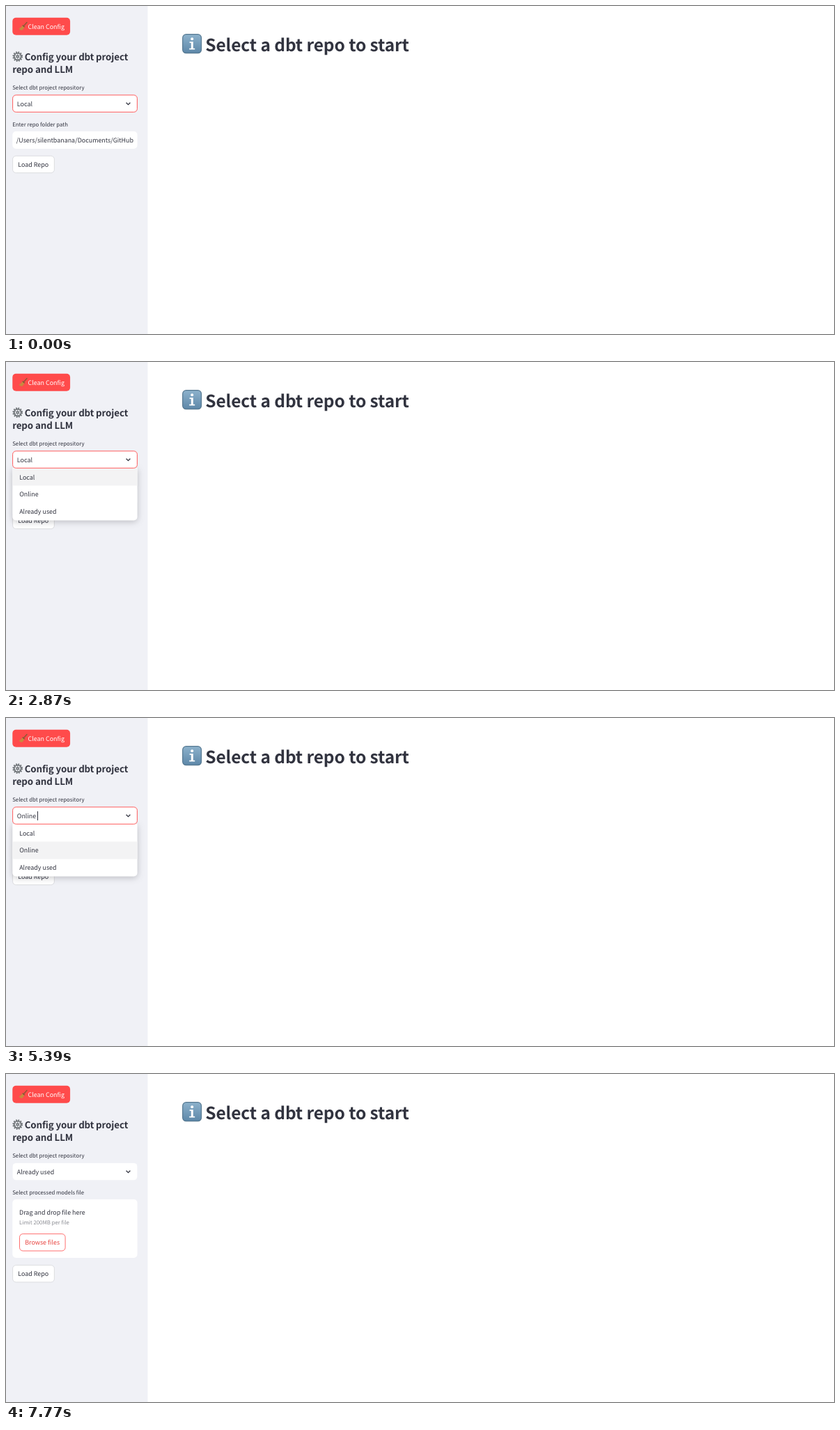
An HTML page for the animation above (8000 ms loop, 1189 by 471 pixels).

```html
<!DOCTYPE html>
<html lang="en">
<head>
<meta charset="utf-8">
<title>Repo setup</title>
<style>
  html, body { margin: 0; width: 100%; height: 100%; overflow: hidden; background: #fff; }
  svg { display: block; width: 1189px; height: 471px; }
  text {
    font: 8.93px "Noto Sans CJK JP", "Noto Sans CJK SC", "Noto Sans CJK", Lato, sans-serif;
    fill: #31333f; text-rendering: geometricPrecision; white-space: pre;
  }
  .small { font-size: 7.8px; }
  .dim { fill: #8b8c93; }
  .h1 { font-size: 24.5px; font-weight: 700; letter-spacing: -.12px; }
  .h2 { font-size: 13.37px; font-weight: 700; letter-spacing: -.13px; }
  .field { fill: #fff; }
  .button { fill: #fff; stroke: #d5d6da; stroke-width: .8; }
  #menu { filter: drop-shadow(0 2.5px 5px rgba(38, 39, 48, .26)); }
  .hot rect { stroke: #ff4b4b; }
  .hot text { fill: #e8433f; }
</style>
</head>
<body>
<svg viewBox="0 0 1189 471">
  <defs>
    <linearGradient id="steel" x2="0" y2="1">
      <stop offset="0" stop-color="#8db2cc"/>
      <stop offset="1" stop-color="#5d87a8"/>
    </linearGradient>
  </defs>

  <rect width="1189" height="471" fill="#fff"/>
  <rect width="203.5" height="471" fill="#f0f1f6"/>

  <!-- page title -->
  <rect x="253.7" y="40.7" width="26.8" height="27" rx="5" fill="url(#steel)" stroke="#557891" stroke-width="1.2"/>
  <g fill="#fff">
    <circle cx="267.2" cy="47.2" r="2"/>
    <path d="M263.6 51.2h5.2v9.6h2.4v1.8h-8v-1.8h2.6v-7.8h-2.2z"/>
  </g>
  <text class="h1" x="286.3" y="65">Select a dbt repo to start</text>

  <!-- clean button with broom -->
  <rect x="9.3" y="16.8" width="82.8" height="25" rx="5" fill="#ff4b4b"/>
  <path d="M30 23.6L25.4 28.8" stroke="#8f5a35" stroke-width="1.5" stroke-linecap="round"/>
  <path d="M24 27.2L27 30.2L23.2 35Q20.4 34.8 18.4 32.6Q22 31 24 27.2z" fill="#c9893f"/>
  <path d="M23.8 27.6L26.6 30.4" stroke="#7b4a38" stroke-width="1.3"/>
  <text x="31.5" y="32.6" style="fill:#fff">Clean Config</text>

  <!-- sidebar heading with gear -->
  <g fill="none" stroke="#696e72" transform="translate(16.7 72.6)">
    <circle r="6.5" stroke-width="1.7" stroke-dasharray="1.7 1.703"/>
    <circle r="5" stroke-width="1.8"/>
    <path d="M0-4.5V4.5M-3.9-2.25L3.9 2.25M-3.9 2.25L3.9-2.25" stroke="#878c90" stroke-width="1"/>
    <circle r="1.7" fill="#b5b9bc" stroke-width="1.1"/>
  </g>
  <text class="h2" x="26.7" y="78">Config your dbt project</text>
  <text class="h2" x="9.2" y="96">repo and LLM</text>

  <text class="small" x="9.2" y="120.4">Select dbt project repository</text>
  <text class="small" x="9.2" y="172.6" id="label"></text>

  <g id="input">
    <rect class="field" x="9.3" y="180" width="179.3" height="25" rx="5"/>
    <text x="14.8" y="195.8" id="path"></text>
  </g>

  <g id="upload">
    <rect class="field" x="9.3" y="180" width="179.3" height="84" rx="5"/>
    <text x="19" y="201.5">Drag and drop file here</text>
    <text class="small dim" x="19" y="216.2">Limit 200MB per file</text>
    <g id="browse">
      <rect class="button" x="19.5" y="229.6" width="65.6" height="24.4" rx="4.8"/>
      <text x="27.2" y="245.3">Browse files</text>
    </g>
  </g>

  <g id="load">
    <rect class="button" x="9.6" y="215.3" width="59.8" height="24.3" rx="4.8"/>
    <text x="17.2" y="230.8">Load Repo</text>
  </g>

  <g id="menu">
    <path d="M9.3 152H188.6V222.5a5 5 0 0 1-5 5H14.3a5 5 0 0 1-5-5z" fill="#fff"/>
    <rect id="row" x="9.3" width="179.3" height="25" fill="#f3f3f4"/>
    <text x="19.2" y="168.5">Local</text>
    <text x="19.2" y="193.3">Online</text>
    <text x="19.2" y="218.2">Already used</text>
  </g>

  <rect class="field" x="9.6" y="127.9" width="178.8" height="24.4" rx="4.8"/>
  <rect id="ring" x="9.6" y="127.9" width="178.8" height="24.4" rx="4.8" fill="none" stroke="#ff4b4b" stroke-width=".9"/>
  <text x="15.8" y="143.7" id="choice"></text>
  <rect id="caret" y="134" width="1" height="13" fill="#31333f"/>
  <path d="M172.6 138.7L175.5 141.6L178.4 138.7" fill="none" stroke="#31333f" stroke-width="1.3"/>
</svg>
<script>
  const LOOP = 8000;
  const $ = id => document.getElementById(id);

  const forms = {
    local: ["Enter repo folder path", "/Users/silentbanana/Documents/GitHub"],
    online: ["Enter repo URL", "https://github.com/dbt-labs/jaffle-shop"],
    used: ["Select processed models file", ""]
  };
  const caretX = { "Local": 40, "Online": 45, "Already used": 71 };

  // Each step changes only the listed values; menu is the lit row, or -1 when closed.
  const steps = [
    [0, { choice: "Local", form: "local", caret: 0, menu: -1, ring: 1, hot: false }],
    [1190, { caret: 1 }],
    [1750, { caret: 0 }],
    [2240, { caret: 1 }],
    [2310, { caret: 0 }],
    [2380, { caret: 1, menu: 0 }],
    [2870, { caret: 0 }],
    [3220, { choice: "Online", caret: 1, menu: -1 }],
    [3570, { form: "online" }],
    [3780, { caret: 0 }],
    [4270, { caret: 1 }],
    [4830, { caret: 0 }],
    [4970, { caret: 1 }],
    [5040, { menu: 1 }],
    [5530, { caret: 0 }],
    [5880, { choice: "Already used", caret: 1, menu: -1 }],
    [6090, { form: "used" }],
    [6440, { caret: 0 }],
    [6650, { hot: true }],
    [6930, { caret: 1 }],
    [7490, { caret: 0 }],
    [7700, { ring: 0.5 }],
    [7770, { ring: 0 }]
  ];

  const show = (id, on) => $(id).setAttribute("visibility", on ? "visible" : "hidden");

  function draw(s) {
    const used = s.form === "used";
    const [label, path] = forms[s.form];
    $("label").textContent = label;
    $("path").textContent = path;
    $("choice").textContent = s.choice;
    $("caret").setAttribute("x", caretX[s.choice]);
    $("row").setAttribute("y", 152.5 + 25 * Math.max(s.menu, 0));
    $("ring").setAttribute("opacity", s.ring);
    $("load").setAttribute("transform", `translate(0 ${used ? 59.3 : 0})`);
    $("browse").setAttribute("class", s.hot ? "hot" : "");
    show("caret", s.caret);
    show("menu", s.menu >= 0);
    show("input", !used);
    show("upload", used);
  }

  const start = performance.now();
  let last = -1;

  function tick() {
    const t = (performance.now() - start) % LOOP;
    const past = steps.filter(([at]) => at <= t);
    if (past.length !== last) {
      last = past.length;
      draw(Object.assign({}, ...past.map(([, change]) => change)));
    }
    requestAnimationFrame(tick);
  }
  tick();
</script>
</body>
</html>
```
